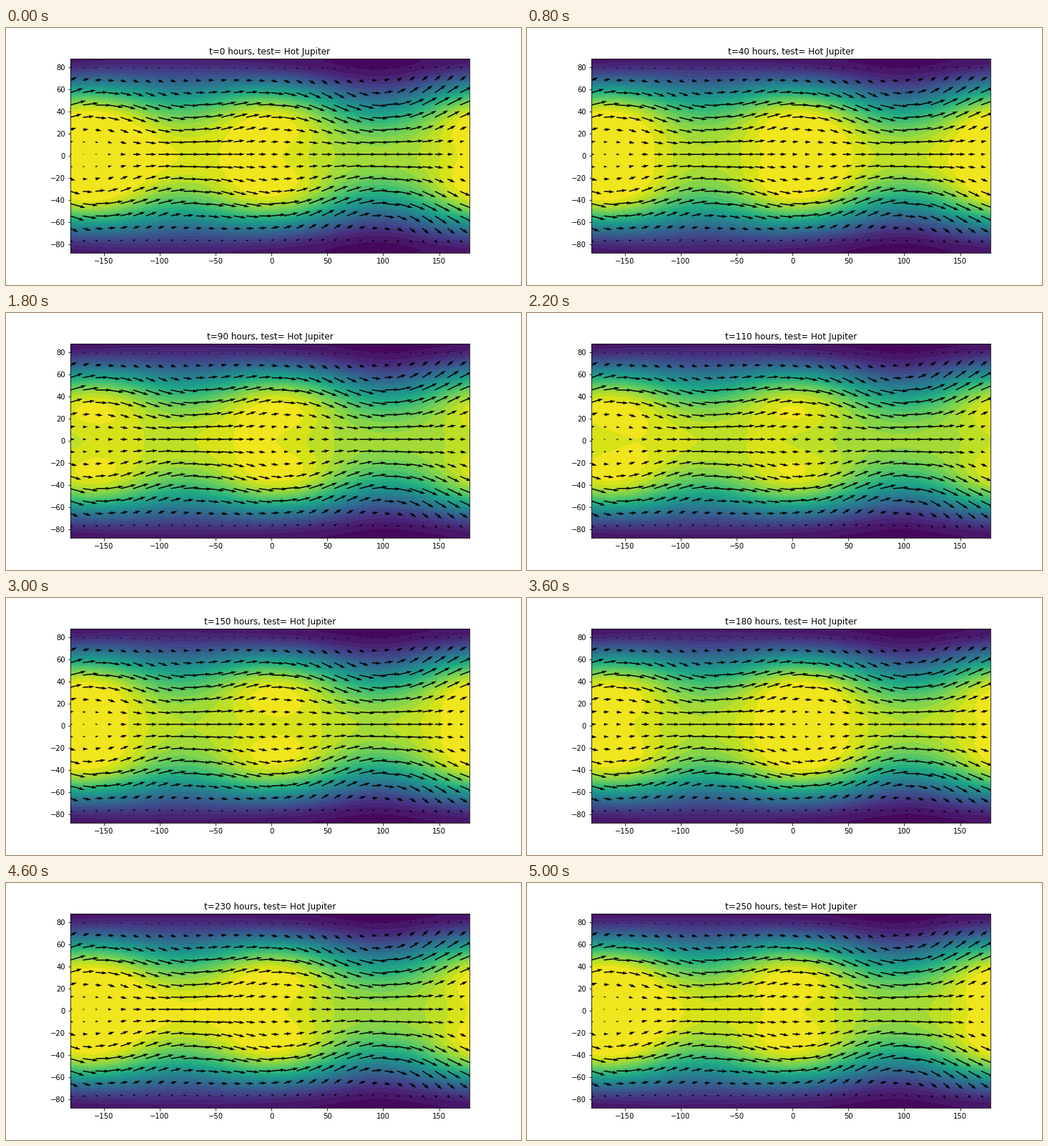
A matplotlib script that plays this animation: 720 px wide and 360 px high, repeating every 5200 ms.

```python
import numpy as np
import matplotlib.pyplot as plt
from matplotlib.animation import FuncAnimation

FRAMES, INTERVAL, HOURS = 26, 200, 10
BANDS = 25
PERIOD = 120  # hours of one swing of the flow

# Gaussian grid, 128 x 64
lon = -180 + 360 / 128 * np.arange(128)
lat = np.degrees(np.arcsin(np.polynomial.legendre.leggauss(64)[0]))
X, Y = np.meshgrid(lon, lat)
QX, QY = np.meshgrid(lon[::4], lat[::4])


def swing(t, peak, period=PERIOD):
    return np.cos(2 * np.pi * (t - peak) / period)


def bump(x, centre, width):
    d = (x - centre + 180) % 360 - 180
    return np.exp(-(d / width) ** 2)


def wave(x, k, peak):
    return np.cos(np.radians(k * (x - peak)))


def trough(t):
    """Longitude of the deepest trough."""
    return 101 - 10 * swing(t, 15)


def height(t):
    """Geopotential in units of colour bands."""
    sin2 = np.sin(np.radians(Y)) ** 2
    cos = np.cos(np.radians(Y))
    drift = 0.9 * swing(t, 20, 200)
    start = np.exp(-t / 40)
    low = trough(t)

    west = 3.8 + drift + 1.2 * swing(t, 20)
    middle = 3.5 + drift - 0.9 * swing(t, 5)
    equator = (21 + west * bump(X, -157 - 16 * swing(t, 45), 65)
               + middle * bump(X, -2 + 15 * swing(t, 45), 63))

    phi = 23 - (21.95 - 0.25 * start) * sin2 ** 2
    phi += (equator - 23) * np.exp(-(Y / 42) ** 2)
    phi += 3.5 * 4 * sin2 * cos ** 2 * wave(X, 2, 8 + 0.5 * (low - 97))
    phi += (1.7 + 0.7 * start) * sin2 * cos ** 0.75 / 0.447 * wave(X, 1, low + 175)
    return np.clip(phi, 0.02, BANDS - 0.02)


def wind(t):
    a = np.abs(QY)
    sin = np.sin(np.radians(a))
    cos = np.cos(np.radians(QY))
    ridge = 10 + 0.3 * (trough(t) - 97)

    u = (13 + 7 * np.exp(-((a - 44) / 14) ** 2)) * (1 - sin ** 12)
    u += wave(QX, 2, ridge) * (3 * np.exp(-((a - 55) / 12) ** 2)
                               - 8 * np.exp(-(a / 32) ** 2))
    u -= (1.5 + 2.5 * swing(t, 10)) * wave(QX, 1, -150) * np.exp(-(a / 30) ** 2)

    v = 7.2 * sin ** 1.4 * cos ** 1.6 / 0.355 * wave(QX, 2, ridge - 45)
    v += (3.2 + 0.9 * swing(t, 0)) * sin ** 3 * cos ** 1.3 / 0.27 * wave(QX, 1, 165)
    return u, v * np.sign(QY)


fig = plt.figure(figsize=(10, 5), dpi=72, facecolor="white")
ax = fig.add_axes([0.125, 0.125, 0.775, 0.755])


def draw(i):
    hour = i * HOURS
    ax.clear()
    ax.contourf(X, Y, height(hour), levels=np.arange(BANDS + 1), cmap="viridis")
    ax.quiver(QX, QY, *wind(hour))
    ax.set_xlim(lon[0], lon[-1])
    ax.set_ylim(lat[0], lat[-1])
    ax.set_title(f"t={hour} hours, test= Hot Jupiter", fontsize=12)
    return []


anim = FuncAnimation(fig, draw, frames=FRAMES, interval=INTERVAL,
                     init_func=lambda: draw(0), repeat=True, repeat_delay=0)
plt.show()
```
